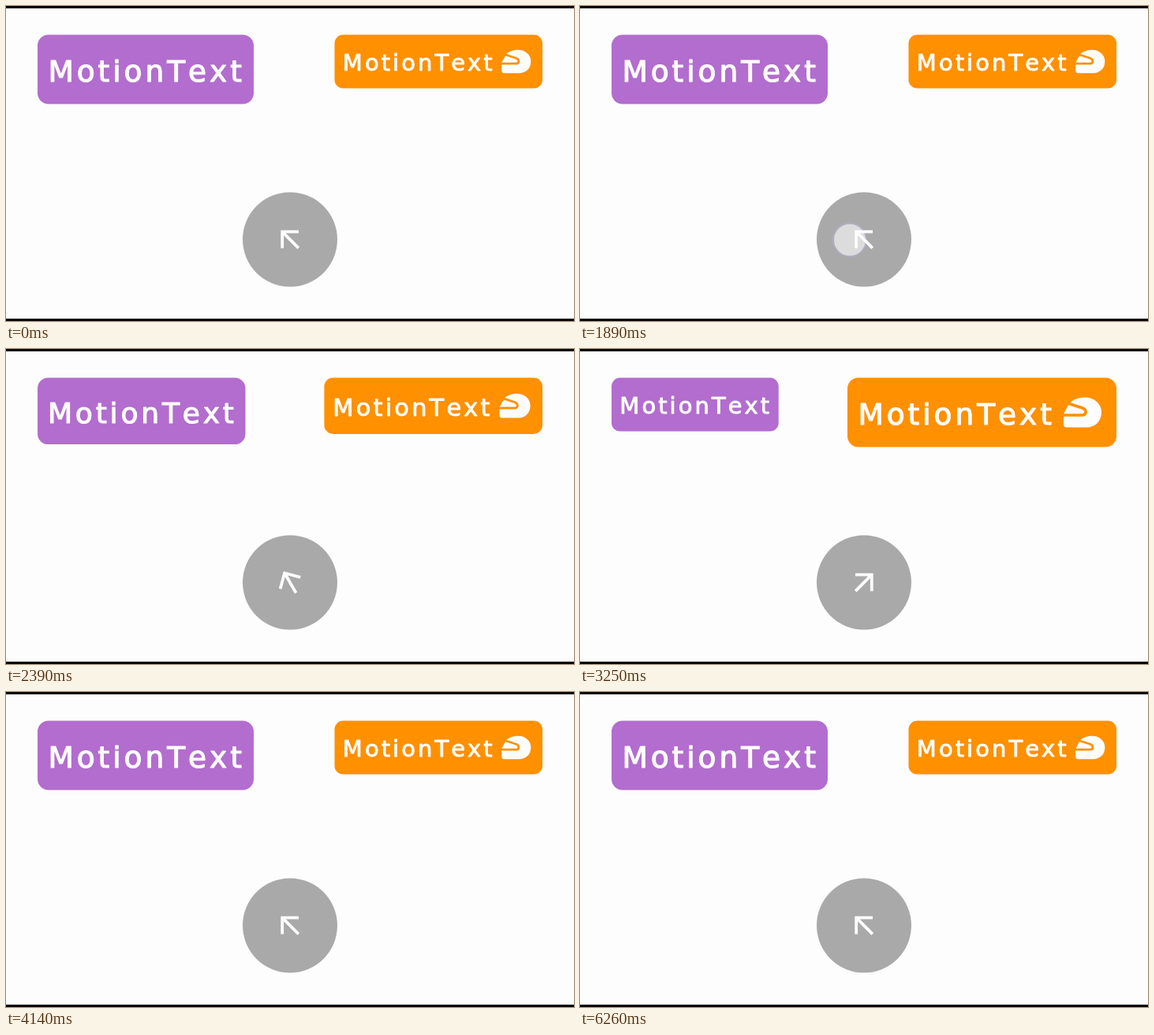
Recreate the animation shown at these times as an HTML page with a canvas. Size 720 px wide and 400 px high, loop 6320 ms.

```html
<!DOCTYPE html>
<html lang="en">
<head>
<meta charset="utf-8">
<title>Scaling buttons</title>
<style>
  html, body { margin: 0; width: 100%; height: 100%; overflow: hidden; background: #fdfdfd; }
  canvas { display: block; }
</style>
</head>
<body>
<canvas id="stage" width="720" height="400" aria-label="Two MotionText buttons and a round toggle"></canvas>
<script>
const ctx = document.getElementById('stage').getContext('2d');
const LOOP = 6320;
const LIGHT = '#fdfdfd', PURPLE = '#b26dce', ORANGE = '#ff9000', GRAY = '#a9a9a9';
const SMALL = 68 / 88;
// Each tap: finger down, finger up (which starts the toggle).
const TAPS = [{ down: 1890, up: 2368 }, { down: 3510, up: 3690 }];

// Slightly bouncy spring from 0 to 1.
function spring(ms) {
  if (ms <= 0) return 0;
  const speed = 30, damping = 0.72, root = Math.sqrt(1 - damping * damping);
  const x = speed * ms / 1000;
  return 1 - Math.exp(-damping * x) *
    (Math.cos(root * x) + damping / root * Math.sin(root * x));
}

function panel(w, color) {
  ctx.fillStyle = color;
  ctx.beginPath();
  ctx.roundRect(0, 0, w, 88, 14);
  ctx.fill();
}

function label() {
  ctx.font = '37.5px "DejaVu Sans", sans-serif';
  ctx.fontKerning = 'none';
  ctx.letterSpacing = '3.95px';
  ctx.fillStyle = ctx.strokeStyle = LIGHT;
  ctx.lineWidth = 1.2;
  ctx.lineJoin = 'round';
  ctx.fillText('MotionText', 13.4, 59.5);
  ctx.strokeText('MotionText', 13.4, 59.5);
}

function helmet() {
  ctx.fillStyle = LIGHT;
  ctx.beginPath();
  ctx.moveTo(274, 46);
  ctx.lineTo(274, 59);
  ctx.quadraticCurveTo(274, 63, 278, 63);
  ctx.lineTo(303, 63);
  ctx.bezierCurveTo(314, 63, 322, 55, 322, 44);
  ctx.bezierCurveTo(322, 33, 313, 25, 301, 25);
  ctx.bezierCurveTo(292, 25, 285, 28, 281, 33);
  ctx.lineTo(275, 44);
  ctx.closePath();
  ctx.fill();

  ctx.strokeStyle = ORANGE;
  ctx.lineWidth = 3.6;
  ctx.beginPath();
  ctx.moveTo(278, 32);
  ctx.lineTo(298, 38.5);
  ctx.bezierCurveTo(304, 41, 303, 47.5, 297, 47.5);
  ctx.lineTo(271, 47.5);
  ctx.stroke();
}

function button(x, scale, paint) {
  ctx.save();
  ctx.translate(x, 36.5);
  ctx.scale(scale, scale);
  paint();
  ctx.restore();
}

function disc(x, y, r, color) {
  ctx.fillStyle = color;
  ctx.beginPath();
  ctx.arc(x, y, r, 0, Math.PI * 2);
  ctx.fill();
}

function arrow(turn) {
  ctx.save();
  ctx.translate(360, 296.5);
  ctx.rotate(turn);
  ctx.strokeStyle = LIGHT;
  ctx.lineWidth = 3.8;
  ctx.lineJoin = 'miter';
  ctx.beginPath();
  ctx.moveTo(11, -9.8);
  ctx.lineTo(-9.8, -9.8);
  ctx.lineTo(-9.8, 11);
  ctx.moveTo(-9.8, -9.8);
  ctx.lineTo(10.8, 10.8);
  ctx.stroke();
  ctx.restore();
}

function touch() {
  disc(342, 297, 21, '#dcdcdc');
  ctx.strokeStyle = '#adadc4';
  ctx.lineWidth = 2;
  ctx.stroke();
}

function draw(t) {
  const p = spring(t - TAPS[0].up) - spring(t - TAPS[1].up);
  const grow = (1 - SMALL) * p;

  ctx.fillStyle = LIGHT;
  ctx.fillRect(0, 0, 720, 400);
  ctx.fillStyle = '#000';
  ctx.fillRect(0, 0, 720, 3);
  ctx.fillRect(0, 397, 720, 3);

  button(40, 1 - grow, () => { panel(274, PURPLE); label(); });
  const scale = SMALL + grow;
  button(680 - 341 * scale, scale, () => { panel(341, ORANGE); label(); helmet(); });

  disc(360, 296.5, 60, GRAY);
  if (TAPS.some(tap => t >= tap.down && t < tap.up)) touch();
  arrow(p * Math.PI / 2);
}

const start = performance.now();
function frame() {
  draw((performance.now() - start) % LOOP);
  requestAnimationFrame(frame);
}
frame();
</script>
</body>
</html>
```
